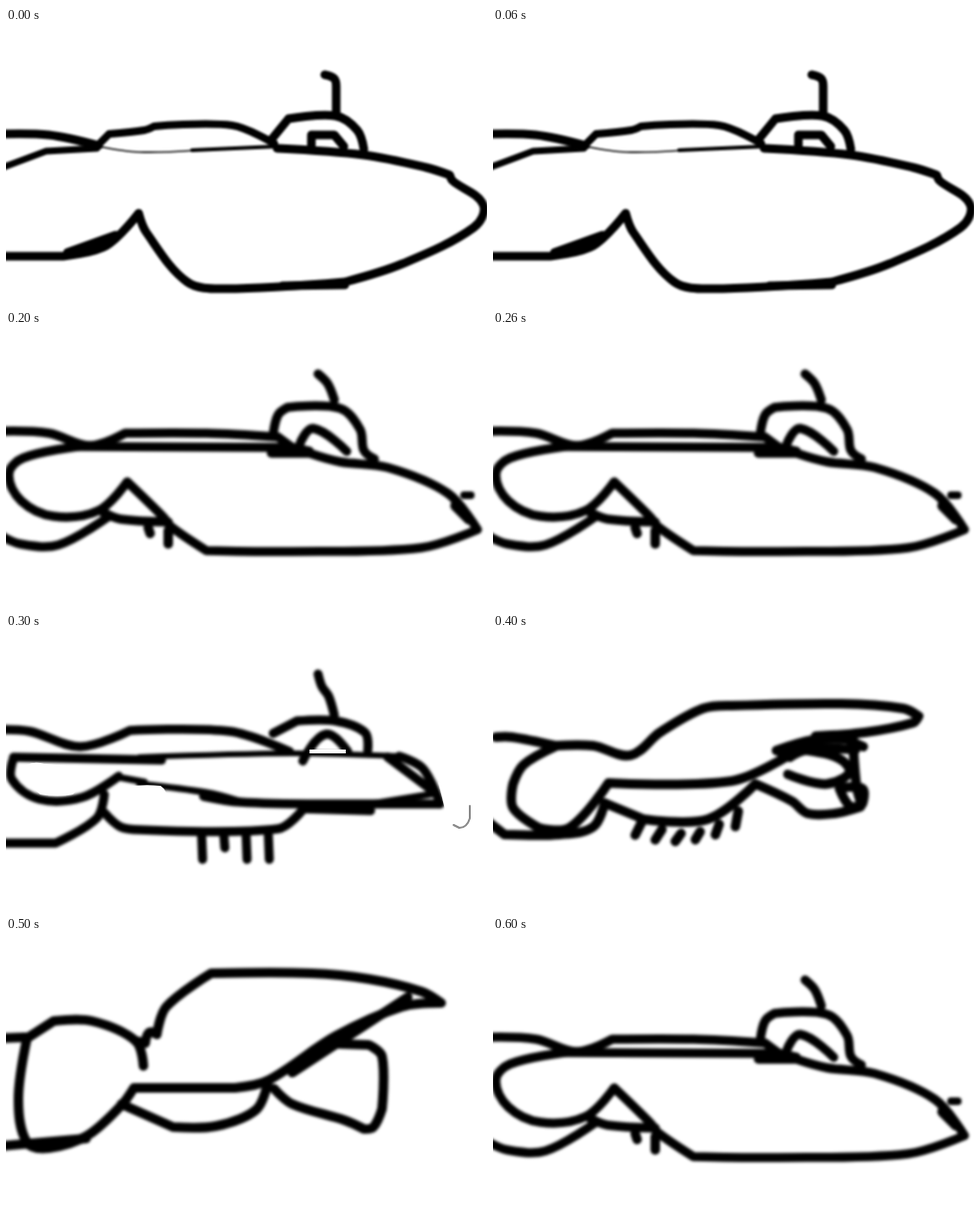
Recreate the animation shown at these times as an HTML page. Size 504x288 px, loop 0.7 s.

```html
<!DOCTYPE html>
<html lang="en">
<head>
<meta charset="utf-8">
<title>Submarine sketch</title>
<style>
  html, body { margin: 0; width: 100%; height: 100%; overflow: hidden; background: #fff; }
  svg { display: block; width: 504px; height: 288px; }
  path { fill: none; stroke: #000; stroke-linecap: round; stroke-linejoin: round; }
  .erase { fill: #fff; stroke: none; }
  .shade { stroke: #888; stroke-width: 2; filter: blur(0.7px); }
</style>
</head>
<body>
<svg id="stage" viewBox="0 0 504 288"></svg>
<script>
const STEP = 100;
const ORDER = [0, 1, 2, 3, 4, 5, 2];

// A row of short strokes; leg(i) gives the top, lean and length of each.
const legs = (count, leg) => Array.from({ length: count }, (_, i) => {
  const { x, y, lean, len } = leg(i);
  return `${x},${y} ${x + lean},${y + len}`;
});

const shortLegs = legs(4, i => ({ x: 205 + 23.3 * i, y: 211, lean: 1, len: i === 1 ? 13 : 25 }));
const bellyLegs = legs(6, i => ({
  x: 157 + 20 * i, y: 209 - 3 * (i - 2.2) ** 2, lean: i - 8, len: 8 + 1.3 * (i - 2.5) ** 2
}));

// Strokes are smooth curves through key points; "/" marks a corner,
// and "width:" in front overrides the pose's pen.
const POSES = [
  { pen: 9, blur: 0.9, lines: [
    '-6,111 45,112 97,123',
    '7:-6,147 42,129 / 95,126',
    '8:97,122 108,111 / 145,107 155,103 / 237,102 281,121',
    '1.6:97,124 140,130 200,128',
    '4:195,128 284,124',
    '278,117 296,95 / 345,92 368,107 375,127',
    '320,123 320,112 / 344,112 / 354,124',
    '334,49 344,53 346,62 / 346,90',
    '284,126 375,133 440,146 465,154 / 468,160 500,185 490,209 415,247 355,266 / 230,273 190,266 147,214 139,194 / 105,228 60,239 / -6,239',
    '290,270 355,269',
    '11:65,236 115,218'
  ] },
  { pen: 9.5, blur: 1.8, lines: [
    '-6,104 52,104 / 92,123',
    '92,114 116,101 / 220,101 280,116',
    '279,124 276,112 308,85 / 335,84 367,99 379,132 376,141',
    '318,121 316,109 324,104 / 349,104 354,124',
    '11:352,112 353,123',
    '328,45 340,55 349,77',
    '-4,140 7,155 50,134 103,129',
    '85,121 95,127 / 210,127 240,130 / 350,133 410,144 436,154 473,159 / 496,177 472,214 / 410,221 350,230 315,239 270,245 220,243 167,203 151,183 97,200 28,206 / 6,183 7,155'
  ] },
  { pen: 9.5, blur: 1.7, lines: [
    '-6,105 45,107 88,120 125,107 / 210,107 285,111 / 300,122',
    '75,121 300,122 / 318,126',
    '278,128 318,128 / 350,137 400,143 463,170 494,208 / 435,227 300,231 210,230 / 173,205 165,195 127,158 / 97,188 50,194 16,178 3,150 18,133 75,121',
    '280,108 285,88 295,80 / 350,81 371,103 375,125 386,134',
    '308,118 322,102 357,126',
    '327,45 337,55 344,72',
    '-6,214 15,223 55,224 108,194',
    '102,190 120,197 170,200',
    '10:149,206 151,212',
    '10:170,209 170,223',
    '8:480,172 487,172',
    '11:471,183 485,197'
  ] },
  { pen: 9.5, blur: 1.6, lines: [
    '-6,100 25,102 78,118 130,101 / 235,102 297,123',
    '8,129 163,132',
    '6:140,129 300,125 412,128',
    '412,128 437,141 455,178',
    '400,129 448,165',
    '8,130 6,152 35,173 80,171 118,149',
    '7:118,150 145,155',
    '7:140,157 210,166 245,175',
    '207,170 245,176 330,178 / 453,178',
    '7:370,180 450,167',
    '312,183 382,185',
    '-6,219 52,219 / 95,193 103,168',
    '103,187 120,202 140,205 / 285,204 311,184',
    ...shortLegs,
    '280,104 305,91 / 345,91 376,103 379,122',
    '311,133 335,105 358,123',
    '327,42 331,55 338,65 344,85'
  ], erase: [
    'M22 137Q30 133 40 136L78 139Q79 160 70 168Q55 171 36 168L29 162L33 152L22 147Z',
    'M124 160Q145 157 162 159Q170 164 168 176L124 178Z',
    'M318 121H356V125H318Z',
    'M453 155L486 172V196Q478 206 468 200L460 184Z'
  ], shade: 'M486 180V193Q483 203 475 203L469 200' },
  { pen: 10, blur: 1.7, lines: [
    '3,108 20,108 65,117 / 105,117 144,127 175,103 220,78 250,75 / 365,73 430,78 446,86 / 440,93 390,103 338,107',
    '65,118 32,137 21,157 / 21,182 48,203 / 80,203 121,156 / 250,154 310,127',
    '-6,196 12,210 / 70,210 105,202 117,177 / 158,194 / 225,194 275,157 / 313,175 330,188 358,188 385,181',
    ...bellyLegs,
    '297,122 335,111 370,110 / 388,118',
    '300,123 330,119 380,121',
    '311,129 330,122 373,140 350,157 309,147',
    '377,110 381,160 386,178 / 375,181 363,162 / 387,162 387,178'
  ] },
  { pen: 10, blur: 1.7, lines: [
    '-6,106 20,105',
    '22,106 50,88 / 90,88 136,109 144,135',
    '136,109 146,111 / 150,100 158,102 / 168,73 215,38 / 320,38 380,44 435,57 456,69 / 415,73 345,104 275,150 240,158 / 134,158 / 121,176 85,208 45,221 22,215 13,170 22,106',
    '421,63 300,142',
    '-6,219 84,211',
    '121,175 175,199 / 220,198 262,181 274,154',
    '281,159 300,175 355,192 375,201 / 385,199 394,180 / 394,125 380,113 / 350,112'
  ] }
];

function add(parent, tag, attrs) {
  const node = document.createElementNS('http://www.w3.org/2000/svg', tag);
  for (const key in attrs) node.setAttribute(key, attrs[key]);
  return parent.appendChild(node);
}

const dist = (a, b) => Math.hypot(b[0] - a[0], b[1] - a[1]) || 1;

// Bezier handle at p, parallel to the chord from prev to next.
function handle(p, prev, next, reach) {
  if (!prev || !next) return p;
  const k = reach / 3 / dist(prev, next);
  return [p[0] + (next[0] - prev[0]) * k, p[1] + (next[1] - prev[1]) * k];
}

function trace(text) {
  let d = '', corner;
  for (const run of text.split(' / ')) {
    const pts = run.split(' ').map(p => p.split(',').map(Number));
    if (corner) pts.unshift(corner);
    else d = 'M' + pts[0];
    for (let i = 1; i < pts.length; i++) {
      const a = pts[i - 1], b = pts[i], reach = dist(a, b);
      d += `C${handle(a, pts[i - 2], b, reach)} ${handle(b, a, pts[i + 1], -reach)} ${b}`;
    }
    corner = pts[pts.length - 1];
  }
  return d;
}

function draw({ pen, blur, lines, erase = [], shade }) {
  const group = add(stage, 'g', {});
  const ink = add(group, 'g', { style: `filter: blur(${blur}px)` });
  for (const line of lines) {
    const [points, width = pen] = line.split(':').reverse();
    add(ink, 'path', { d: trace(points), 'stroke-width': width });
  }
  for (const d of erase) add(group, 'path', { d, class: 'erase' });
  if (shade) add(group, 'path', { d: shade, class: 'shade' });
  return group;
}

const stage = document.getElementById('stage');
POSES.map(draw).forEach((group, i) => {
  const steps = [...ORDER, ORDER[ORDER.length - 1]].map((shown, k) => ({
    opacity: shown === i ? 1 : 0,
    offset: k / ORDER.length,
    easing: 'step-end'
  }));
  group.animate(steps, { duration: STEP * ORDER.length, iterations: Infinity });
});
</script>
</body>
</html>
```
